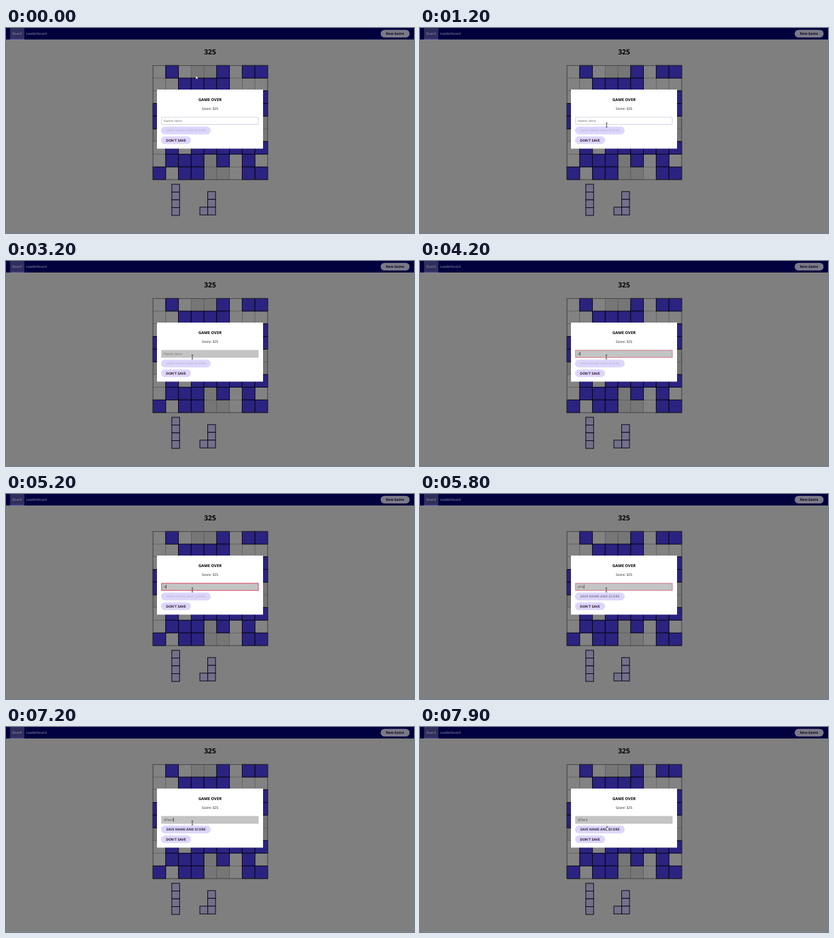
Write an HTML page that moves like this. It is 600x303 px and loops after 8 s.

```html
<!DOCTYPE html>
<html lang="en">
<head>
<meta charset="utf-8">
<title>Game over</title>
<style>
  html, body { margin: 0; width: 100%; height: 100%; overflow: hidden; background: #7f7f7f; }
  svg { display: block; width: 600px; height: 303px; font: 5px "Noto Sans", "Open Sans", sans-serif; text-rendering: geometricPrecision; }
  .bold { font-weight: 700; }
  .mid { text-anchor: middle; }
</style>
</head>
<body>
<svg viewBox="0 0 600 303">
  <rect width="600" height="303" fill="#7f7f7f"/>
  <rect width="600" height="17" fill="#00003f"/>
  <rect x="6" width="21" height="17" fill="#302f5c"/>
  <rect x="6" y="15.8" width="21" height="1.2" fill="#48409a"/>
  <text x="9.2" y="10" fill="#8e8ca4">Board</text>
  <text x="29.6" y="10" fill="#8e8ea0">Leaderboard</text>
  <rect x="551" y="2.7" width="42.5" height="11.4" rx="5.7" fill="#7b7987"/>
  <text class="bold mid" x="572" y="10.1" fill="#0c0820">New Game</text>
  <text class="bold mid" x="300" y="39.4" font-size="10.3">325</text>
  <g id="board"></g>
  <g id="pieces" fill="#73718a" stroke="#0c0a1c"></g>

  <rect x="222" y="91" width="156" height="87.3" fill="#fff"/>
  <text class="bold mid" x="300" y="107.7" font-size="5.85">GAME OVER</text>
  <text class="mid" x="300" y="120.8" fill="#222">Score: 325</text>
  <rect id="field" x="228.8" y="132" width="142.2" height="10.4" stroke-width=".7"/>
  <rect id="alert" x="228.8" y="132" width="142.2" height="10.4" fill="none" stroke="#e0405e" stroke-width=".9"/>
  <text id="hint" x="232" y="138.9" fill="#777">Name Here</text>
  <text id="typed" x="232" y="138.9" fill="#444"></text>
  <rect id="caret" y="134.2" width=".6" height="5.8" fill="#222"/>
  <rect x="228" y="145.8" width="73" height="11.4" rx="5.7" fill="#ddd6fb"/>
  <text id="save" class="bold" x="235.4" y="153.4" fill="#342b40">SAVE NAME AND SCORE</text>
  <rect x="228" y="160.2" width="44" height="11.4" rx="5.7" fill="#ddd6fb"/>
  <text class="bold" x="235.2" y="167.7" fill="#30152c">DON'T SAVE</text>

  <g id="pointer">
    <path id="arrow" d="M0 0V4.8L1.2 3.8L2 5.5L2.8 5.1L2 3.4H3.5Z" fill="#fff" stroke="#222" stroke-width=".3"/>
    <path id="beam" d="M-1.2 -3H1.2M0 -3V3M-1.2 3H1.2" fill="none" stroke="#222" stroke-width=".7"/>
    <path id="hand" d="M-.6 -3V.6L-1.8 -.1L-2.3 .6L-.6 3.2H2.3L2.9 .2Q2.8 -.8 .4 -.9V-3Q-.1 -3.5 -.6 -3Z" fill="#eee" stroke="#333" stroke-width=".5"/>
  </g>
</svg>
<script>
  const LOOP = 8000;
  const $ = id => document.getElementById(id);
  const set = (el, attrs) => { for (const k in attrs) el.setAttribute(k, attrs[k]); };
  const addRect = (parent, attrs) => {
    const el = document.createElementNS("http://www.w3.org/2000/svg", "rect");
    set(el, attrs);
    parent.append(el);
  };

  // Filled cells are marked with #.
  const rows = [
    ".#...#.##", "..####...", "........#",
    "#.......#", "#........", ".........",
    ".#.######", ".###.#.#.", "#.##...##"
  ];
  const cell = 18.75;
  for (const filled of [false, true]) {
    rows.forEach((row, r) => [...row].forEach((mark, c) => {
      if ((mark === "#") !== filled) return;
      const shaded = (Math.floor(r / 3) + Math.floor(c / 3)) % 2;
      addRect($("board"), {
        x: 216.1 + c * cell, y: 55.3 + r * cell, width: cell, height: cell,
        fill: filled ? "#2b2380" : shaded ? "#767676" : "#828282",
        stroke: filled ? "#07051a" : "#555",
        "stroke-width": filled ? 1 : .5
      });
    }));
  }
  addRect($("board"), { x: 216.1, y: 55.3, width: cell * 9, height: cell * 9, fill: "none", stroke: "#333", "stroke-width": .6 });

  const addPiece = (x, y, cells) => cells.forEach(([c, r]) =>
    addRect($("pieces"), { x: x + c * 11.5, y: y + r * 11.5, width: 11.5, height: 11.5 }));
  addPiece(243.8, 231, [[0, 0], [0, 1], [0, 2], [0, 3]]);
  addPiece(285.1, 241.8, [[1, 0], [1, 1], [1, 2], [0, 2]]);

  // Step tables: start time, then the value held from there on.
  const pointerSteps = [
    [0, "arrow", 279.2, 70.6], [100, "arrow", 278, 84], [200, "arrow", 275, 106],
    [300, "arrow", 271, 128], [400, "arrow", 270, 146], [500, "beam", 273, 146],
    [600, "beam", 274.5, 144.5], [800, "beam", 274.5, 144], [1200, "beam", 274.5, 143.3],
    [1800, "beam", 274, 141.8], [7700, "beam", 274.4, 143], [7800, "hand", 274.8, 147.5],
    [7900, "hand", 275, 149.5]
  ];
  const textSteps = [[0, 0], [4200, 1], [5300, 2], [5700, 3], [6300, 4], [6900, 5]];
  const caretSteps = [
    [0, 0], [1600, 1], [2100, 0], [2700, 1], [3200, 0], [3700, 1],
    [4700, 0], [5200, 1], [7500, 0]
  ];
  const name = "d7ec4";

  const at = (steps, t) => steps.findLast(step => step[0] <= t);
  const ramp = (t, from, to) => Math.min(1, Math.max(0, (t - from) / (to - from)));

  function draw(t) {
    const [, shape, x, y] = at(pointerSteps, t);
    for (const id of ["arrow", "beam", "hand"]) set($(id), { visibility: id === shape ? "visible" : "hidden" });
    set($("pointer"), { transform: `translate(${x} ${y})` });

    const focused = t >= 1600;
    set($("field"), { fill: focused ? "#c4c4c4" : "#fff", stroke: focused ? "#b9b9b9" : "#c5c3d6" });

    const count = at(textSteps, t)[1];
    $("typed").textContent = name.slice(0, count);
    set($("hint"), { opacity: count ? 0 : 1 });
    const width = count ? $("typed").getComputedTextLength() : 0;
    set($("caret"), { x: 232.1 + width, opacity: at(caretSteps, t)[1] });

    const valid = ramp(t, 5600, 6100);
    set($("alert"), { opacity: t < 4200 ? 0 : (.6 + .4 * ramp(t, 4200, 4700)) * (1 - valid) });
    set($("save"), { opacity: .14 + .86 * valid });
  }

  function tick() {
    draw(performance.now() % LOOP);
    requestAnimationFrame(tick);
  }
  tick();
</script>
</body>
</html>
```
